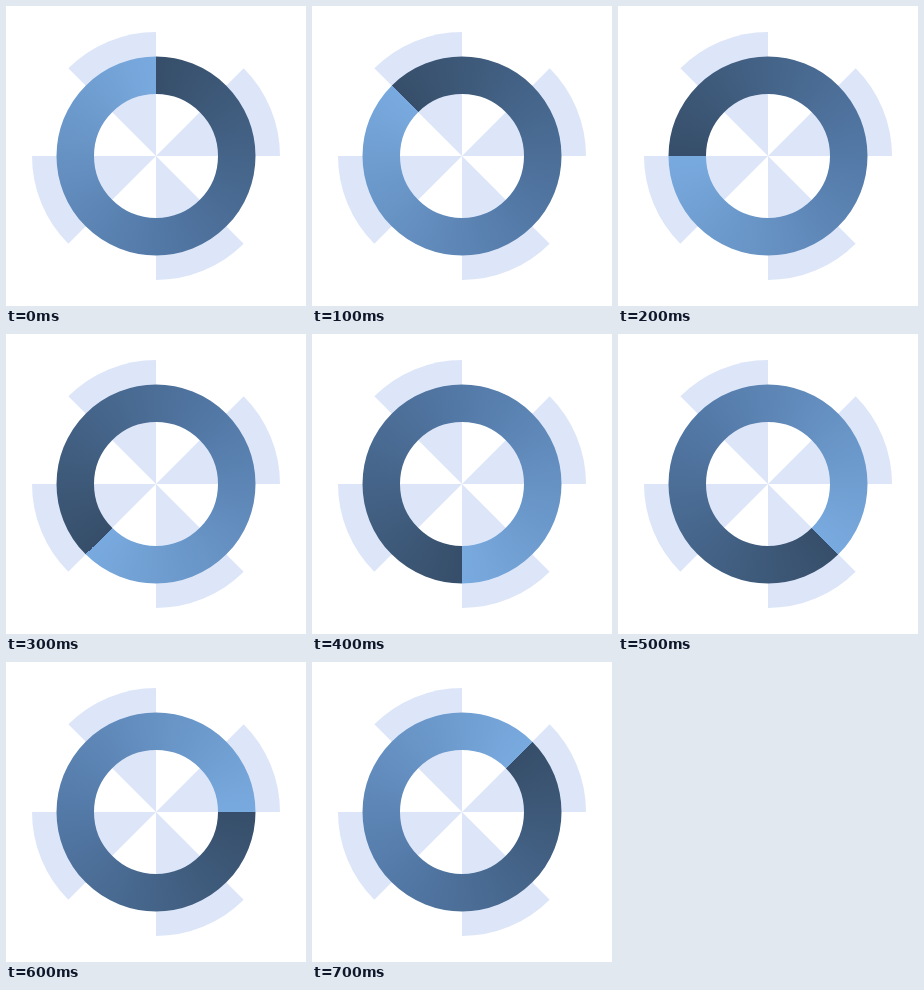
Recreate the animation shown at these times as an HTML page with a canvas. Size 300 px wide and 300 px high, loop 800 ms.

```html
<!DOCTYPE html>
<html lang="en">
<head>
<meta charset="utf-8">
<title>Turning ring</title>
<style>
  html, body { margin: 0; width: 100%; height: 100%; overflow: hidden; background: #fff; }
  canvas { display: block; width: 100vw; height: 100vh; }
</style>
</head>
<body>
<canvas width="300" height="300"></canvas>
<script>
const ctx = document.querySelector('canvas').getContext('2d');
const CENTER = 150, INNER = 62, OUTER = 99.5, WEDGE = 124;
const TURN = Math.PI * 2, STEPS = 8, STEP_MS = 100;
const TOP = -TURN / 4, EIGHTH = TURN / STEPS;

function drawWedges() {
  ctx.fillStyle = '#dde6f8';
  for (let i = 1; i < STEPS; i += 2) {
    const from = TOP + i * EIGHTH;
    ctx.beginPath();
    ctx.moveTo(CENTER, CENTER);
    ctx.arc(CENTER, CENTER, WEDGE, from, from + EIGHTH);
    ctx.fill();
  }
}

function drawRing(start) {
  const shade = ctx.createConicGradient(start, CENTER, CENTER);
  shade.addColorStop(0, 'rgb(54, 78, 105)');
  shade.addColorStop(0.5, 'rgb(83, 121, 167)');
  shade.addColorStop(1, 'rgb(121, 170, 223)');
  ctx.strokeStyle = shade;
  ctx.lineWidth = OUTER - INNER;
  ctx.beginPath();
  ctx.arc(CENTER, CENTER, (OUTER + INNER) / 2, 0, TURN);
  ctx.stroke();
}

function render(ms) {
  // The ring jumps an eighth of a turn counter-clockwise at each step.
  const step = Math.floor(ms / STEP_MS) % STEPS;
  ctx.clearRect(0, 0, 300, 300);
  drawWedges();
  drawRing(TOP - step * EIGHTH);
}

const began = performance.now();
function tick() {
  render(performance.now() - began);
  requestAnimationFrame(tick);
}
tick();
</script>
</body>
</html>
```
